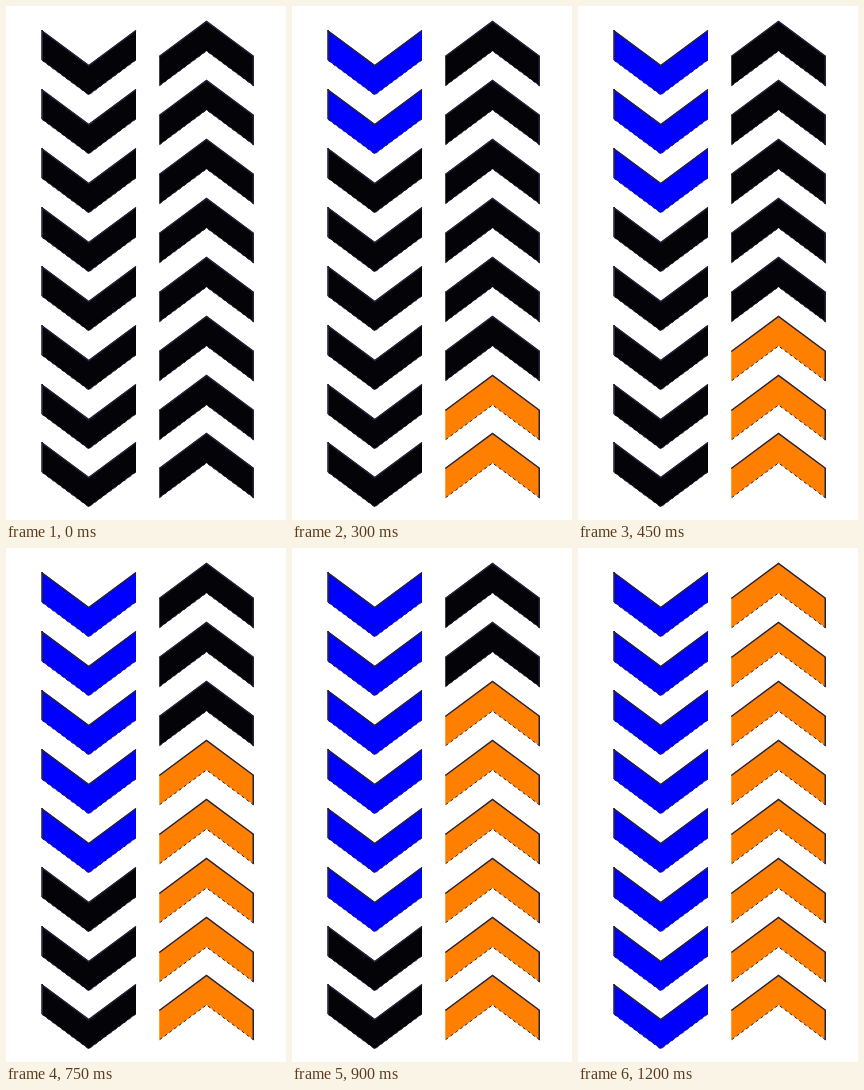
An HTML page for the animation above (1350 ms loop, 280 px wide and 514 px high).

```html
<!DOCTYPE html>
<html lang="en">
<head>
<meta charset="utf-8">
<title>Chevron lanes</title>
<style>
  html, body { margin: 0; width: 100%; height: 100%; overflow: hidden; background: #fff; }
  svg { display: block; }
</style>
</head>
<body>
<svg id="stage" width="280" height="514" viewBox="0 0 280 514"></svg>
<script>
const STEP = 150;
const COUNT = 8;
const PITCH = 58.86;
const HALF = 47.25;
const DEPTH = 30;
const IDLE = '#040308';
const EDGE = '#28223a';
const stage = document.getElementById('stage');

function addPath(d, attrs = {}) {
  const path = document.createElementNS('http://www.w3.org/2000/svg', 'path');
  path.setAttribute('d', d);
  for (const name in attrs) path.setAttribute(name, attrs[name]);
  stage.append(path);
  return path;
}

// Side edges run from `side` to `side + DEPTH`; the middle is shifted by `bend`.
function addChevron(x, side, bend, edgeX) {
  const top = `M${x} ${side}l${HALF} ${bend}l${HALF} ${-bend}`;
  const bottom = `l${-HALF} ${bend}l${-HALF} ${-bend}`;
  const body = addPath(`${top}v${DEPTH}${bottom}z`);
  const line = { fill: 'none', stroke: EDGE, 'stroke-width': 1.5 };
  addPath(`M${x} ${side + 0.5}l${HALF} ${bend}l${HALF} ${-bend}`, line);
  addPath(`M${edgeX} ${side}v${DEPTH}`, line);
  addPath(`M${x + 2 * HALF} ${side + DEPTH}${bottom}`,
    { ...line, 'stroke-width': 1, 'stroke-dasharray': '3 3' });
  return body;
}

function addLane({ x, side, bend, edgeX, color, upward }) {
  const bodies = Array.from({ length: COUNT }, (_, i) =>
    addChevron(x, Math.round(side + i * PITCH), bend, edgeX));
  return { color, bodies: upward ? bodies.reverse() : bodies };
}

const lanes = [
  addLane({ x: 35.5, side: 24.4, bend: 35, edgeX: 36.25, color: '#0000ff', upward: false }),
  addLane({ x: 153.25, side: 50.4, bend: -35, edgeX: 247.25, color: '#ff8000', upward: true })
];

function draw(time) {
  const lit = Math.floor(time / STEP) % (COUNT + 1);
  for (const { color, bodies } of lanes) {
    bodies.forEach((body, i) => body.setAttribute('fill', i < lit ? color : IDLE));
  }
}

const start = performance.now();
function tick() {
  draw(performance.now() - start);
  requestAnimationFrame(tick);
}
draw(0);
requestAnimationFrame(tick);
</script>
</body>
</html>
```
